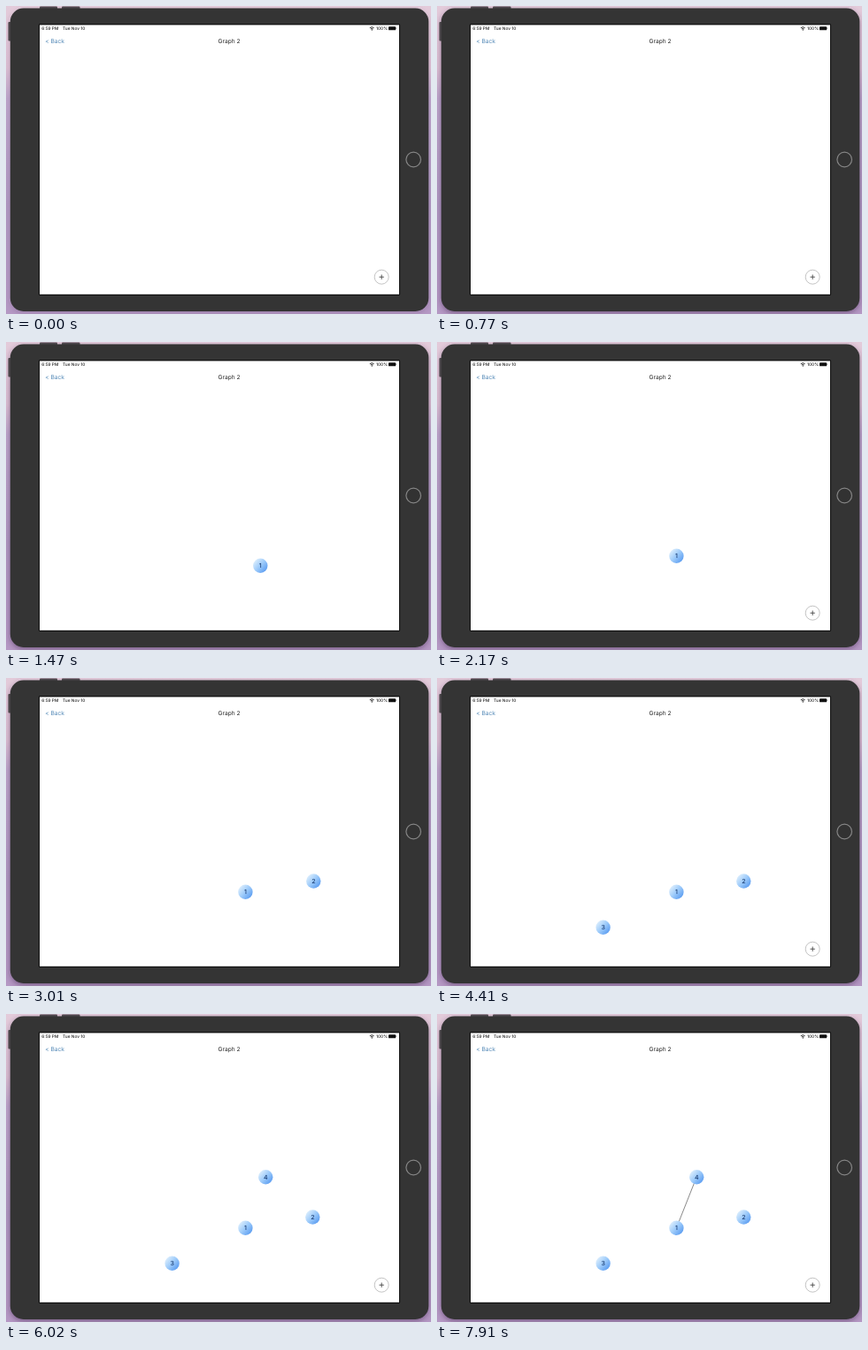
Recreate the animation shown at these times as an HTML page. Size 480 px wide and 348 px high, loop 8000 ms.

```html
<!DOCTYPE html>
<html lang="en">
<head>
<meta charset="utf-8">
<title>Graph editor</title>
<style>
  html, body { margin: 0; width: 100%; height: 100%; overflow: hidden; }
  svg { display: block; width: 480px; height: 348px; }
  text { font-family: Inter, Roboto, sans-serif; text-rendering: geometricPrecision; fill: #222; }
  .status { font-size: 4.8px; font-weight: 500; }
  .nav { font-size: 6.6px; }
  .label { font-size: 7px; font-weight: 500; fill: #173a70; text-anchor: middle; }
</style>
</head>
<body>
<svg viewBox="0 0 480 348">
  <defs>
    <linearGradient id="wall" x2="0" y2="1">
      <stop offset="0" stop-color="#e3cbda"/>
      <stop offset=".2" stop-color="#dcbfd3"/>
      <stop offset=".3" stop-color="#bda5cb"/>
      <stop offset=".65" stop-color="#b098c2"/>
      <stop offset="1" stop-color="#b598c4"/>
    </linearGradient>
    <linearGradient id="ball" x1=".1" y1=".15" x2=".9" y2=".85">
      <stop offset="0" stop-color="#dceefd"/>
      <stop offset=".5" stop-color="#9ccafa"/>
      <stop offset="1" stop-color="#5c9df1"/>
    </linearGradient>
    <filter id="soft" filterUnits="userSpaceOnUse" x="-20" y="-20" width="520" height="390">
      <feGaussianBlur stdDeviation="3"/>
    </filter>
  </defs>

  <rect width="480" height="348" fill="url(#wall)"/>
  <rect id="shadow" x="5" y="5" width="472" height="342" rx="15" fill="#3c2448" filter="url(#soft)"/>

  <g fill="#4c474c">
    <rect x="38" y="0.5" width="20" height="4" rx="1"/>
    <rect x="63" y="0.5" width="20.5" height="4" rx="1"/>
    <rect x="2.5" y="18" width="4" height="21.5" rx="1"/>
  </g>
  <rect x="4.8" y="2.5" width="472.5" height="342.5" rx="15" fill="#343434"/>
  <circle cx="460.2" cy="173.5" r="8.3" fill="#323232" stroke="#858585" stroke-width="1.2"/>
  <rect x="37.3" y="20.4" width="407.4" height="306.3" fill="#000"/>
  <rect x="38" y="21.4" width="406" height="304.4" fill="#fff"/>

  <text class="status" x="40.2" y="27.2">6:59 PM</text>
  <text class="status" x="64" y="27.2">Tue Nov 10</text>
  <text class="status" x="418" y="27.2">100%</text>
  <g fill="none" stroke="#222" stroke-width=".9">
    <path d="M410.8 24.7q2.4-2 4.8 0M411.8 26q1.4-1.2 2.8 0"/>
    <circle cx="413.2" cy="27" r=".3"/>
  </g>
  <rect x="432" y="23.3" width="8.2" height="4" rx=".9" fill="#111"/>
  <rect x="440.5" y="24.6" width=".6" height="1.4" fill="#555"/>

  <text class="nav" x="44.2" y="42" style="fill:#4f86b5">&lt; Back</text>
  <text class="nav" x="252" y="42" text-anchor="middle">Graph 2</text>

  <g id="add">
    <circle cx="424.2" cy="306.2" r="8" fill="#fff" stroke="#b4b4b4" stroke-width=".8"/>
    <path d="M421.5 306.2h5.4M424.2 303.5v5.4" stroke="#333" stroke-width=".8"/>
  </g>
  <line id="edge" stroke="#6a6a6a" stroke-width=".8"/>
  <g id="nodes"></g>
  <line id="pull" stroke="#6a6a6a" stroke-width=".8"/>
</svg>
<script>
const LOOP = 8000, STEP = 70;
const home = { x: 424.2, y: 306.2 };
// show: node leaves the button; from..to: drag; bend: sag of its path; drop: button returns
const nodes = [
  { x: 270.4, y: 241.8, show: 980, from: 930, to: 1610, bend: 10, drop: 1610 },
  { x: 346.3, y: 229.5, show: 2800, from: 2730, to: 3030, bend: -20, drop: 3080 },
  { x: 187.6, y: 281.7, show: 4060, from: 3990, to: 4200, bend: 0, drop: 4200 },
  { x: 293.2, y: 184.2, show: 5460, from: 5390, to: 5880, bend: 0, drop: 5880 }
];
const $ = id => document.getElementById(id);
const toggle = (el, on) => { el.style.display = on ? "" : "none"; };
const mix = (a, b, p) => a + (b - a) * p;
const ease = (t, a, b) => {
  const p = Math.min(1, Math.max(0, (t - a) / (b - a)));
  return p * p * (3 - 2 * p);
};

function make(tag, attrs, parent) {
  const el = document.createElementNS("http://www.w3.org/2000/svg", tag);
  for (const k in attrs) el.setAttribute(k, attrs[k]);
  return parent.appendChild(el);
}

function setLine(el, a, x, y) {
  el.setAttribute("x1", a.x);
  el.setAttribute("y1", a.y);
  el.setAttribute("x2", x);
  el.setAttribute("y2", y);
}

nodes.forEach((n, i) => {
  n.el = make("g", {}, $("nodes"));
  make("circle", { r: 8.2, fill: "url(#ball)" }, n.el);
  make("text", { class: "label", y: 2.5 }, n.el).textContent = i + 1;
});

const [first, , , last] = nodes;
setLine($("edge"), first, last.x, last.y);

function draw(time) {
  const t = Math.floor(time / STEP) * STEP;
  $("shadow").setAttribute("opacity", t < 770 ? 0.2 : 0.5);
  for (const n of nodes) {
    const p = ease(t, n.from, n.to);
    const x = mix(home.x, n.x, p);
    const y = mix(home.y, n.y, p) + n.bend * 4 * p * (1 - p);
    toggle(n.el, t >= n.show);
    n.el.setAttribute("transform", `translate(${x} ${y})`);
  }
  toggle($("add"), !nodes.some(n => t >= n.show && t < n.drop));

  // a loose line follows the finger, then snaps to the node
  const p = ease(t, 7000, 7140);
  setLine($("pull"), first, mix(first.x, 301, p), mix(first.y, 180.5, p));
  toggle($("pull"), t >= 7070 && t < 7420);
  toggle($("edge"), t >= 7420);
}

const start = performance.now();
function tick() {
  draw((performance.now() - start) % LOOP);
  requestAnimationFrame(tick);
}
tick();
</script>
</body>
</html>
```
